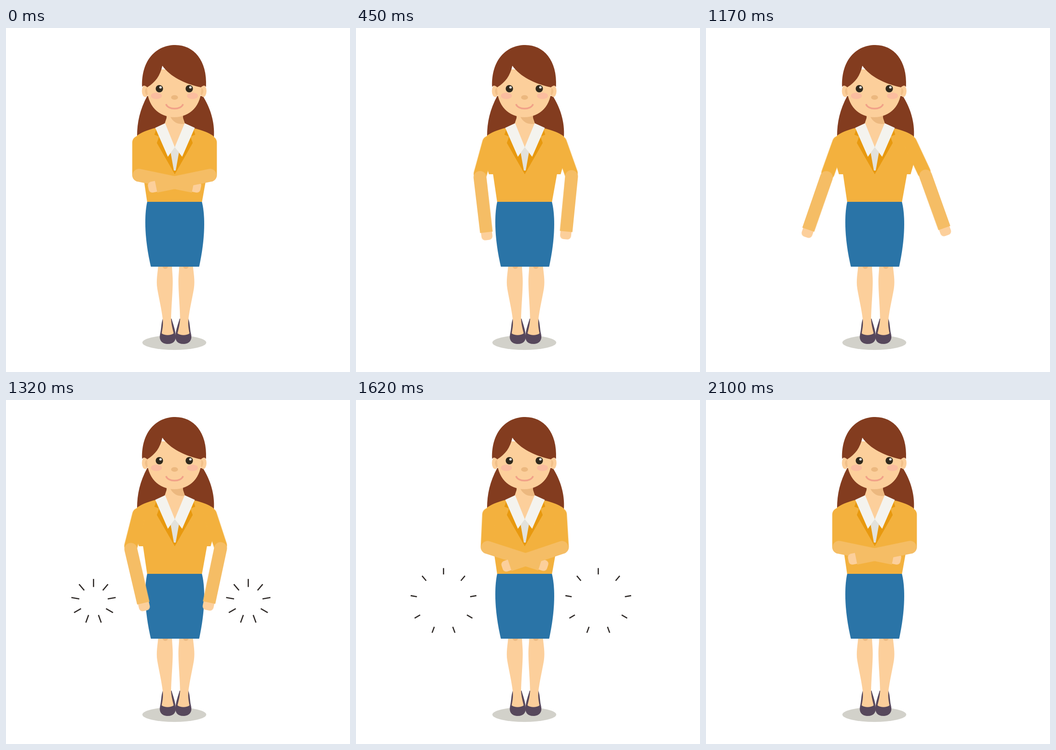
These frames come from a looping animation (748x748 px, 2130 ms). An HTML page:

```html
<!DOCTYPE html>
<html lang="en">
<head>
<meta charset="utf-8">
<title>Crossed arms</title>
<style>
  html, body { margin: 0; width: 100%; height: 100%; overflow: hidden; background: #fff; }
  svg { display: block; width: 100vw; height: 100vh; }

  .skin { fill: #fccf9b; }
  .shade { fill: #ecb87f; }
  .hair { fill: #833c1f; }
  .coat { fill: #f3b13e; }
  .sleeve { fill: #f5bd65; }
  .lapel { fill: #e8990f; }
  .collar { fill: #f4f3ee; }
  .shoe { fill: #57485c; }

  .upper, .fore, .ray { animation: 2130ms -2ms infinite; }
  .left { --up: 20.8deg; --end: 4.7deg; }
  .right { --up: 26.5deg; --end: -.5deg; }
  .upper { transform-origin: 289px 249px; animation-name: swing; }
  .fore { transform-origin: 283.2px 325px; animation-name: unfold; }
  .ray { stroke: #2f2a28; stroke-width: 2.6; animation-name: burst; }

  /* the drawing moves in steps of 30 ms */
  @keyframes swing {
    0% { transform: rotate(0deg); animation-timing-function: steps(4); }
    5.634% { transform: rotate(calc(var(--up) * .13)); animation-timing-function: steps(3); }
    9.859% { transform: rotate(calc(var(--up) * .32)); animation-timing-function: steps(13); }
    28.169%, 53.521% { transform: rotate(var(--up)); animation-timing-function: steps(13); }
    71.831% { transform: rotate(calc(var(--up) * .32)); animation-timing-function: steps(3); }
    76.056% { transform: rotate(calc(var(--up) * .13)); animation-timing-function: steps(4); }
    81.69%, 100% { transform: rotate(0deg); }
  }
  @keyframes unfold {
    0% { transform: rotate(-78.5deg); animation-timing-function: steps(4); }
    5.634% { transform: rotate(-75deg); animation-timing-function: steps(3); }
    9.859% { transform: rotate(-65deg); animation-timing-function: steps(13); }
    28.169%, 53.521% { transform: rotate(var(--end)); animation-timing-function: steps(13); }
    71.831% { transform: rotate(-65deg); animation-timing-function: steps(3); }
    76.056% { transform: rotate(-75deg); animation-timing-function: steps(4); }
    81.69%, 100% { transform: rotate(-78.5deg); }
  }
  @keyframes burst {
    0%, 57.746% { stroke-dasharray: 0px 100px; stroke-dashoffset: 0px; animation-timing-function: steps(3); }
    61.972% { stroke-dasharray: 17.5px 100px; stroke-dashoffset: -1.4px; animation-timing-function: steps(3); }
    66.197% { stroke-dasharray: 24.2px 100px; stroke-dashoffset: -6.8px; animation-timing-function: steps(2); }
    69.014% { stroke-dasharray: 24px 100px; stroke-dashoffset: -12px; animation-timing-function: steps(4); }
    74.648% { stroke-dasharray: 16.2px 100px; stroke-dashoffset: -25.7px; animation-timing-function: steps(3); }
    78.873% { stroke-dasharray: 9px 100px; stroke-dashoffset: -34.8px; animation-timing-function: steps(4); }
    84.507% { stroke-dasharray: 2.4px 100px; stroke-dashoffset: -42.4px; animation-timing-function: steps(10); }
    98.592%, 100% { stroke-dasharray: 0px 100px; stroke-dashoffset: -45px; }
  }
</style>
</head>
<body>
<svg viewBox="0 0 748 748">
  <defs>
    <g id="leg">
      <path class="shoe" d="M341 632C337 643 338 654 335 666C332 680 340 687 352 687C365 687 370 679 369 669C368 655 363 643 360 632Z"/>
      <path class="skin" d="M331 516H361C361 530 363 540 362.500 556C362 582 359 612 359 634C360 648 363 656 364.500 664C358 669 345 669 338.500 664C340 655 342 648 341 634C338 610 333 590 329 567C326 548 330 532 331 516Z"/>
      <ellipse class="shade" cx="346.500" cy="518" rx="6" ry="5.500"/>
    </g>
    <g id="cheek-eye">
      <ellipse cx="327" cy="147.500" rx="12" ry="7" fill="#fbbd9f"/>
      <circle cx="333.500" cy="132" r="8" fill="#30291c"/>
      <circle cx="336" cy="129" r="2.600" fill="#fff"/>
    </g>
  </defs>

  <ellipse cx="366" cy="684" rx="69.500" ry="16" fill="#d2d1ca"/>
  <use href="#leg"/>
  <use href="#leg" transform="translate(737.500 0) scale(-1 1)"/>

  <!-- hair behind, neck -->
  <path class="hair" d="M307 148C291 178 285 205 285 235L452 237C454 205 445 175 428 148Z"/>
  <path class="skin" d="M350 185L349 196L345 208L367 262L389 208L385 196L384 185Z"/>
  <path class="shade" d="M356 190H384L385 196L389 208C373 211 362 204 356 190Z"/>

  <!-- head -->
  <ellipse class="skin" cx="302.500" cy="137" rx="7" ry="13"/>
  <ellipse class="skin" cx="429" cy="137" rx="7" ry="13"/>
  <path class="shade" d="M308 130C300 131 300 142 308 148ZM423.500 130C431 131 431 142 423.500 148Z" opacity=".6"/>
  <path class="skin" d="M307 90V129C306 168 332 194 366 194C400 194 426 168 424.500 129V90Z"/>
  <path class="hair" d="M296 128C294 68 328 37 368 37C408 37 438 70 435 128Q431 122 424 129C388 121 357 106 340 82C335 104 325 118 307 129Q300 122 296 128Z"/>
  <use href="#cheek-eye"/>
  <g>
    <ellipse cx="405.500" cy="147.500" rx="12" ry="7" fill="#fbbd9f"/>
    <circle cx="398.500" cy="132" r="8" fill="#30291c"/>
    <circle cx="401" cy="129" r="2.600" fill="#fff"/>
  </g>
  <ellipse class="shade" cx="366.500" cy="151" rx="7.500" ry="5"/>
  <path d="M348 165.500C352 178.500 381 178.500 385 165.500" fill="none" stroke="#f1a188" stroke-width="3.500"/>

  <!-- jacket and skirt -->
  <path class="coat" d="M326 217Q298 224 285 234L279 245L281 290L289 318H298L307 379H426L437 318H445L453 290L455 245L451 235Q438 225 409 218L367 300Z"/>
  <path class="lapel" d="M327 220L322.500 232L333 236L328 250L367 318L406 250L401 236L411.500 232L408 220L367 258Z"/>
  <path d="M367 257L358 271L365 310H369L376 271Z" fill="#e3e2dc"/>
  <path class="collar" d="M346 207L324.500 217L352 280L367 259ZM388.500 207L410.500 217L383 280L367 259Z"/>
  <path d="M307 378H426C433 405 434 455 420 519H315C300 455 301 405 307 378Z" fill="#2a74a7"/>

  <!-- arms -->
  <g class="left">
    <g class="upper">
      <rect class="coat" x="274.500" y="234.500" width="29" height="99.500" rx="14.500"/>
      <g class="fore">
        <rect class="skin" x="277" y="440" width="24" height="27" rx="8"/>
        <path class="sleeve" d="M275 450V330A14 14 0 0 1 303 330L302.500 450Z"/>
      </g>
    </g>
  </g>
  <g class="right" transform="translate(733 0) scale(-1 1)">
    <g class="upper">
      <rect class="coat" x="274.500" y="234.500" width="29" height="99.500" rx="14.500"/>
      <g class="fore">
        <rect class="skin" x="277" y="440" width="24" height="27" rx="8"/>
        <path class="sleeve" d="M275 450V330A14 14 0 0 1 303 330L302.500 450Z"/>
      </g>
    </g>
  </g>

  <g id="rays"></g>
</svg>
<script>
  const rays = document.getElementById('rays');
  const addRay = (x, angle) => {
    const line = document.createElementNS('http://www.w3.org/2000/svg', 'line');
    line.setAttribute('class', 'ray');
    line.setAttribute('y1', -30);
    line.setAttribute('y2', -75);
    line.setAttribute('transform', `translate(${x} 438) rotate(${angle})`);
    rays.append(line);
  };
  for (const x of [190.3, 526.8])
    for (let i = 0; i < 9; i++) addRay(x, i * 40);
</script>
</body>
</html>
```
